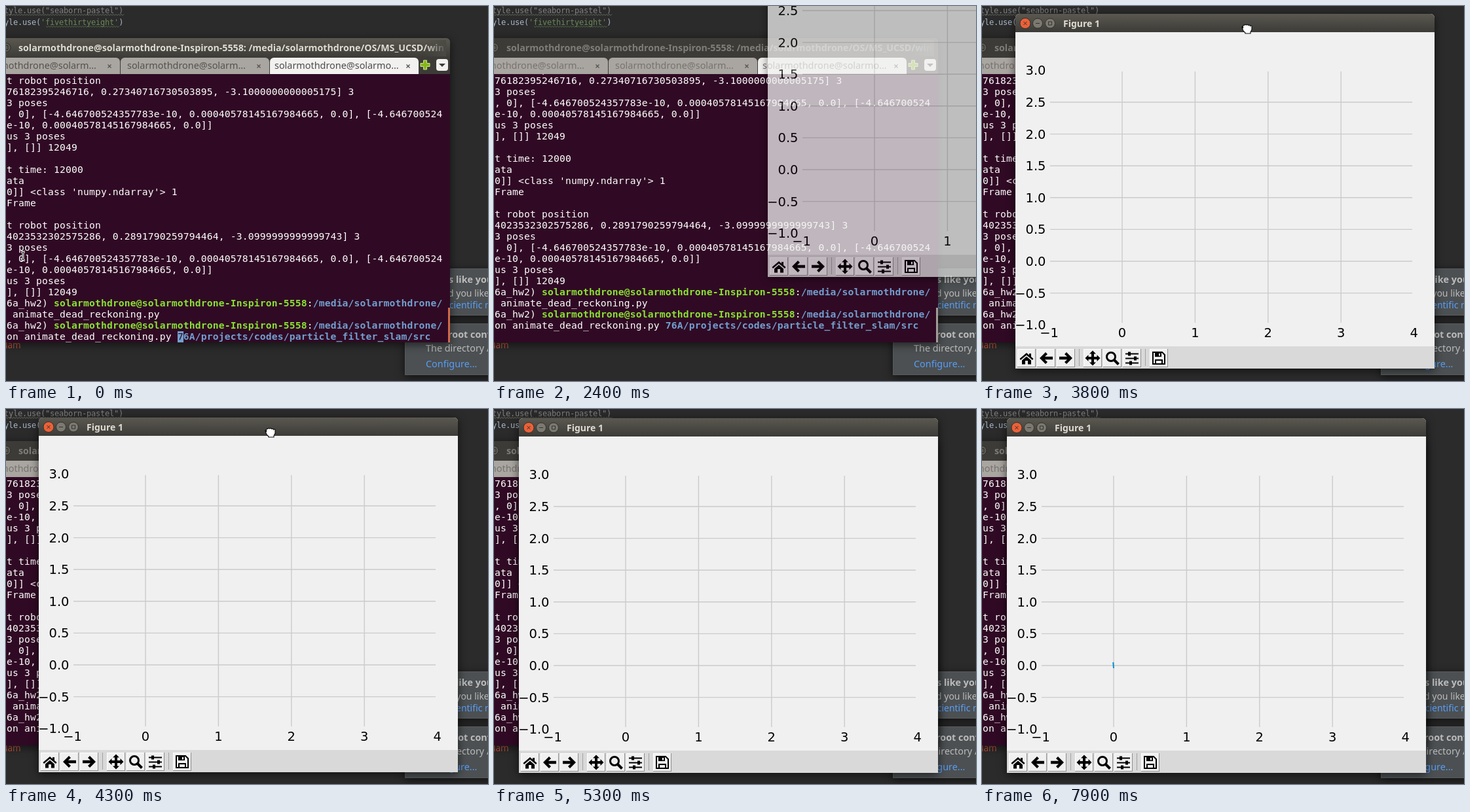
These frames come from a looping animation (736x573 px, 8000 ms). An HTML page:

```html
<!DOCTYPE html>
<html lang="en">
<head>
<meta charset="utf-8">
<title>Dead reckoning run</title>
<style>
html, body { margin: 0; width: 100%; height: 100%; overflow: hidden; background: #2b2b2b; }
svg { display: block; width: 736px; height: 573px; }
text { white-space: pre; font: 14.4px "Noto Sans", "Open Sans", sans-serif; }
.bold { font-weight: 700; }
.code { font: 12px "DejaVu Sans Mono", monospace; letter-spacing: -.22px; }
.mono { font: 14.67px "DejaVu Sans Mono", monospace; letter-spacing: .169px; fill: #fff; }
.user { fill: #8ae234; font-weight: 700; }
.path { fill: #729fcf; font-weight: 700; }
.tick { font: 19.44px "DejaVu Sans", sans-serif; fill: #000; }
.shade { filter: drop-shadow(0 3px 7px rgba(0, 0, 0, .6)); }
.note { fill: #bbb; }
.link { fill: #589df6; }

/* Everything runs on one 8 s clock with hard steps: 1.25% is 100 ms. */
.dim, #beam, #block, #rows, #win, #hand, #arrow, #trace { animation: 8s step-end infinite; }
.dim { fill: var(--on); animation-name: dim; }
#beam { animation-name: beam; }
#block { animation-name: block; }
#rows { animation-name: rows; }
#win { animation-name: win; }
#hand { animation-name: hand; }
#arrow { animation-name: arrow; }
#trace { animation-name: trace; }

@keyframes dim { 0% { fill: var(--on); } 28.75%, 100% { fill: var(--off); } }
@keyframes beam { 0% { opacity: 1; } 2.5%, 100% { opacity: 0; } }
@keyframes block { 0% { opacity: 1; } 5% { opacity: 0; } 12.5% { opacity: 1; } 20%, 100% { opacity: 0; } }
@keyframes rows { 0% { transform: none; } 20%, 100% { transform: translateY(-17px); } }
@keyframes win {
  0% { opacity: 0; transform: translate(418px, -128px); }
  28.75% { opacity: .35; }
  30% { opacity: .75; }
  31.25% { opacity: 1; }
  47.5% { transform: translate(51px, 12px); }
  51.25% { transform: translate(51px, 13px); }
  52.5% { transform: translate(50px, 13px); }
  55% { transform: translate(47px, 13px); }
  56.25% { transform: translate(43px, 14px); }
  57.5% { transform: translate(40px, 14px); }
  58.75%, 100% { opacity: 1; transform: translate(38px, 14px); }
}
@keyframes hand { 0% { opacity: 0; } 47.5% { opacity: 1; } 61.25%, 100% { opacity: 0; } }
@keyframes arrow {
  0% { opacity: 0; transform: translate(716px, 150px); }
  31.25% { opacity: 1; }
  47.5% { opacity: 0; }
  61.25% { opacity: 1; transform: translate(393px, 33px); }
  65% { transform: translate(397px, 33px); }
  66.25%, 100% { opacity: 0; transform: translate(397px, 33px); }
}
@keyframes trace {
  0% { opacity: 0; stroke-width: 1.2px; }
  90% { opacity: .5; }
  91.25% { opacity: .8; }
  92.5% { opacity: 1; stroke-width: 1.6px; }
  96.25% { stroke-width: 1.8px; }
  98.75%, 100% { opacity: 1; stroke-width: 2px; }
}
</style>
</head>
<body>
<svg viewBox="0 0 736 573">
  <defs>
    <linearGradient id="bar" x2="0" y2="1">
      <stop stop-color="#5a5850"/><stop offset="1" stop-color="#3c3b37"/>
    </linearGradient>
    <linearGradient id="fade">
      <stop stop-color="#4a4943" stop-opacity="0"/><stop offset="1" stop-color="#4a4943"/>
    </linearGradient>
    <clipPath id="screen"><path d="M0 104H678V514H0z"/></clipPath>
    <clipPath id="titleClip"><path d="M0 50H671V78H0z"/></clipPath>
  </defs>
  <rect width="736" height="573" fill="#2b2b2b"/>

  <g id="editor">
    <text class="code" x="-3" y="11" fill="#808080">tyle.use("seaborn-pastel")</text>
    <text class="code" x="-3" y="29" fill="#a9b7c6">yle.use(<tspan fill="#6a8759">'fivethirtyeight'</tspan>)</text>
    <text x="-1" y="523" style="font-size:13.5px" fill="#c4513f">lam</text>
  </g>

  <g id="notes">
    <g fill="#4c5052" stroke="#595c5e">
      <rect class="shade" x="609.5" y="401.5" width="140" height="71"/>
      <rect class="shade" x="609.5" y="485.5" width="140" height="78"/>
    </g>
    <g class="note">
      <text class="bold" x="676" y="423">s like you</text>
      <text x="675" y="444" style="font-size:14px">d you like</text>
      <text class="link" x="669" y="462" style="font-size:14px">Scientific mode</text>
      <text class="bold" x="675" y="507">root conf</text>
      <text x="641" y="528">The directory /</text>
      <text class="link" x="641" y="552">Configure...</text>
    </g>
  </g>

  <g id="terminal">
    <path class="shade" d="M-20 49H672a6 6 0 0 1 6 6V514H-20z" fill="#3c3b37"/>
    <path d="M0 49H672a6 6 0 0 1 6 6V79H0z" fill="url(#bar)"/>
    <path class="dim" style="--on:transparent;--off:#3c3b37" d="M0 49H672a6 6 0 0 1 6 6V79H0z"/>
    <circle cx="0" cy="63.500" r="7" fill="#5c5a53" stroke="#2d2c29"/>
    <path d="M-3 60.500H3V66.500H-3" fill="none" stroke="#2d2c29"/>
    <g clip-path="url(#titleClip)">
      <text class="bold dim" style="--on:#dfdbd2;--off:#807d78;font-size:14.2px" x="19" y="69">solarmothdrone@solarmothdrone-Inspiron-5558: /media/solarmothdrone/OS/MS_UCSD/win</text>
    </g>
    <rect x="640" y="52" width="32" height="25" fill="url(#fade)"/>
    <g id="tabs"></g>
    <path d="M637.500 83h5v4.500h4.500v5h-4.500v4.500h-5v-4.500h-4.500v-5h4.500z" fill="#83b81a" stroke="#d6df91"/>
    <rect x="657" y="81" width="18" height="18" rx="4" fill="#f2f1f0"/>
    <path d="M661 88h10l-5 5z" fill="#3c3b37"/>
    <rect y="104" width="678" height="410" fill="#300a24"/>
    <g clip-path="url(#screen)">
      <g id="rows"></g>
      <g id="block">
        <rect x="262" y="497" width="9" height="17" fill="#729fcf"/>
        <text class="mono bold" x="262" y="510" style="fill:#300a24">7</text>
      </g>
    </g>
    <rect class="dim" style="--on:#d0694a;--off:#a09c98" x="675" y="461" width="3" height="53"/>
  </g>

  <g id="beam" fill="none">
    <path d="M23 375.500q3 0 3 2q0-2 3-2M26 377V387M23 388.500q3 0 3-2q0 2 3 2" stroke="#fff" stroke-width="3"/>
    <path d="M23 375.500q3 0 3 2q0-2 3-2M26 377V387M23 388.500q3 0 3-2q0 2 3 2" stroke="#222"/>
  </g>

  <g id="win">
    <path class="shade" d="M0 542V6a6 6 0 0 1 6-6H634a6 6 0 0 1 6 6V542z" fill="#f0f0f0"/>
    <path d="M0 28V6a6 6 0 0 1 6-6H634a6 6 0 0 1 6 6V28z" fill="url(#bar)"/>
    <g stroke="#32312d">
      <circle cx="15" cy="14.500" r="8" fill="#ec6138"/>
      <circle cx="34" cy="14.500" r="7.500" fill="#7b7970"/>
      <circle cx="53" cy="14.500" r="7.500" fill="#7b7970"/>
      <path d="M12.500 12l5 5m0-5l-5 5M31 14.500h6M50.500 12h5v5h-5z" fill="none"/>
    </g>
    <text class="bold" x="73" y="20" style="font-size:14px" fill="#dfdbd2">Figure 1</text>
    <g id="plot"></g>
    <path id="trace" d="M162.300 373L163 382" stroke="#008fd5" fill="none"/>
    <rect y="508" width="640" height="34" fill="#d9d9d9"/>
    <path d="M97.500 512V538M198.500 512V538" stroke="#a3a3a3"/>
    <g id="tools"></g>
    <path id="hand" d="M347 20q-2-1-1 1l2 5 3 3v1h8v-2l2-4v-5q-1-2-2.500-.5q-.5-2-3-1q-1-2-3-.5q-2-1.500-3 .5q-2-.5-2 1.500v3z" fill="#fff" stroke="#111" stroke-width="1.200"/>
  </g>

  <path id="arrow" d="M.5 0V16L4.300 12.500L7 19L9.600 18L7 11.800H11.500z" fill="#fff" stroke="#111" stroke-width="1.100"/>
</svg>
<script>
const $ = id => document.getElementById(id);
const draw = (id, parts) => $(id).insertAdjacentHTML('beforeend', parts.join(''));

// Spell-check squiggles
const wave = (x, end, y, color) => {
  let d = `M${x} ${y}`;
  for (let up = 1; x < end; up = -up) d += `l2 ${2 * up}`, x += 2;
  return `<path d="${d}" fill="none" stroke="${color}" stroke-width=".8"/>`;
};
draw('editor', [wave(0, 179, 12.5, '#76766e'), wave(61, 172, 30.5, '#5f7a52')]);

// Terminal tabs
const user = 'solarmothdrone';
const tab = (x, label, fill, ink, pad) => `
  <path d="M${x} 104V85a6 6 0 0 1 6-6h215a6 6 0 0 1 6 6V104z" fill="${fill}"/>
  <text class="dim" style="--on:${ink};--off:#77736e" x="${x + pad}" y="96">${label}</text>
  <path d="M${x + 208.5} 89.500l5 5m0-5l-5 5" stroke="${ink}" stroke-width="1.200"/>`;
draw('tabs', [
  tab(-53, user + '@solarm…', '#a9a5a0', '#55524e', 10),
  tab(175, user + '@solarm…', '#a9a5a0', '#55524e', 10),
  tab(403, user + '@solarmo…', '#f2f1f0', '#4c4c4c', 7)
]);

// Terminal output
const pose = ['3 poses',
  ', 0], [-4.646700524357783e-10, 0.00040578145167984665, 0.0], [-4.646700524',
  'e-10, 0.00040578145167984665, 0.0]]', 'us 3 poses', '], []] 12049'];
const prompt = `6a_hw2) <tspan class="user">${user}@${user}-Inspiron-5558</tspan>:<tspan class="path">/media/${user}/</tspan>`;
const lines = [
  't robot position', '76182395246716, 0.27340716730503895, -3.1000000000005175] 3', ...pose, '',
  't time: 12000', 'ata', "0]] &lt;class 'numpy.ndarray'&gt; 1", 'Frame', '',
  't robot position', '4023532302575286, 0.2891790259794464, -3.0999999999999743] 3', ...pose,
  prompt, ' animate_dead_reckoning.py', prompt,
  'on animate_dead_reckoning.py <tspan class="path">76A/projects/codes/particle_filter_slam/src</tspan>'
];
draw('rows', lines.map((s, i) => `<text class="mono" x="1" y="${119 + 17 * i}">${s}</text>`));

// Plot grid and tick labels
const px = v => 163 + 111.4 * v;
const py = v => 378 - 97.2 * v;
const minus = s => s.replace('-', '−');
const grid = d => `<path d="${d}" stroke="#cbcbcb" stroke-width="1.400"/>`;
const tick = (x, y, anchor, s) => `<text class="tick" x="${x}" y="${y}" text-anchor="${anchor}">${minus(s)}</text>`;
const plot = [];
for (let v = -1; v <= 4; v++) {
  if (v > -1 && v < 4) plot.push(grid(`M${px(v)} 88V472`));
  plot.push(tick(px(v), 494, 'middle', String(v)));
}
for (let v = -1; v <= 3; v += .5) {
  if (v > -1 && v < 3) plot.push(grid(`M53 ${py(v)}H606`));
  plot.push(tick(46.5, py(v) + 7, 'end', v.toFixed(1)));
}
draw('plot', plot);

// Toolbar
const back = '<path d="M-10 0L-1-9L2-6L-2-2.200H10V2.200H-2L2 6L-1 9z"/>';
const icons = [
  [17, '<path d="M-10.500 1L0-8L4-4.500V-7H7V-2L10.500 1L9 3L0-4.500L-9 3zM-7 3.500L0-2.500L7 3.500V9.500H2V4H-2V9.500H-7z"/>'],
  [47, back],
  [77, `<g transform="scale(-1 1)">${back}</g>`],
  [118, '<path d="M-11.500 0l5-5v3h4.500v-4.500h-3l5-5 5 5h-3v4.500h4.500v-3l5 5-5 5v-3h-4.500v4.500h3l-5 5-5-5h3v-4.500h-4.500v3z"/>'],
  [148, '<circle cx="-2" cy="-2" r="6.500" fill="none" stroke="#000" stroke-width="3"/><path d="M3 3l6.500 6.500" stroke="#000" stroke-width="4"/>'],
  [178, '<path d="M-10-6.500H10M-10 .5H10M-10 7.500H10" stroke="#000" stroke-width="2"/><path d="M-6-9.500h4v6h-4zM3-2.500h4v6h-4zM-4 4.500h4v6h-4z"/>'],
  [219, '<path d="M-9-9H5L9-5V9H-9z" fill="none" stroke="#000" stroke-width="2"/><path d="M-6-9H4V-2H-6zM-6 2H6V9H4V4H-4V9H-6z"/><path d="M0-7h2v3.500h-2z" fill="#fff"/>']
];
draw('tools', icons.map(([x, art]) => `<g transform="translate(${x} 526)">
  <path d="M-14-14H14V14H-14z" fill="#8e8e8e"/><path d="M-14-14H13V13H-14z" fill="#fff"/>
  <path d="M-13-13H13V13H-13z" fill="#f0f0f0"/>${art}</g>`));
</script>
</body>
</html>
```
